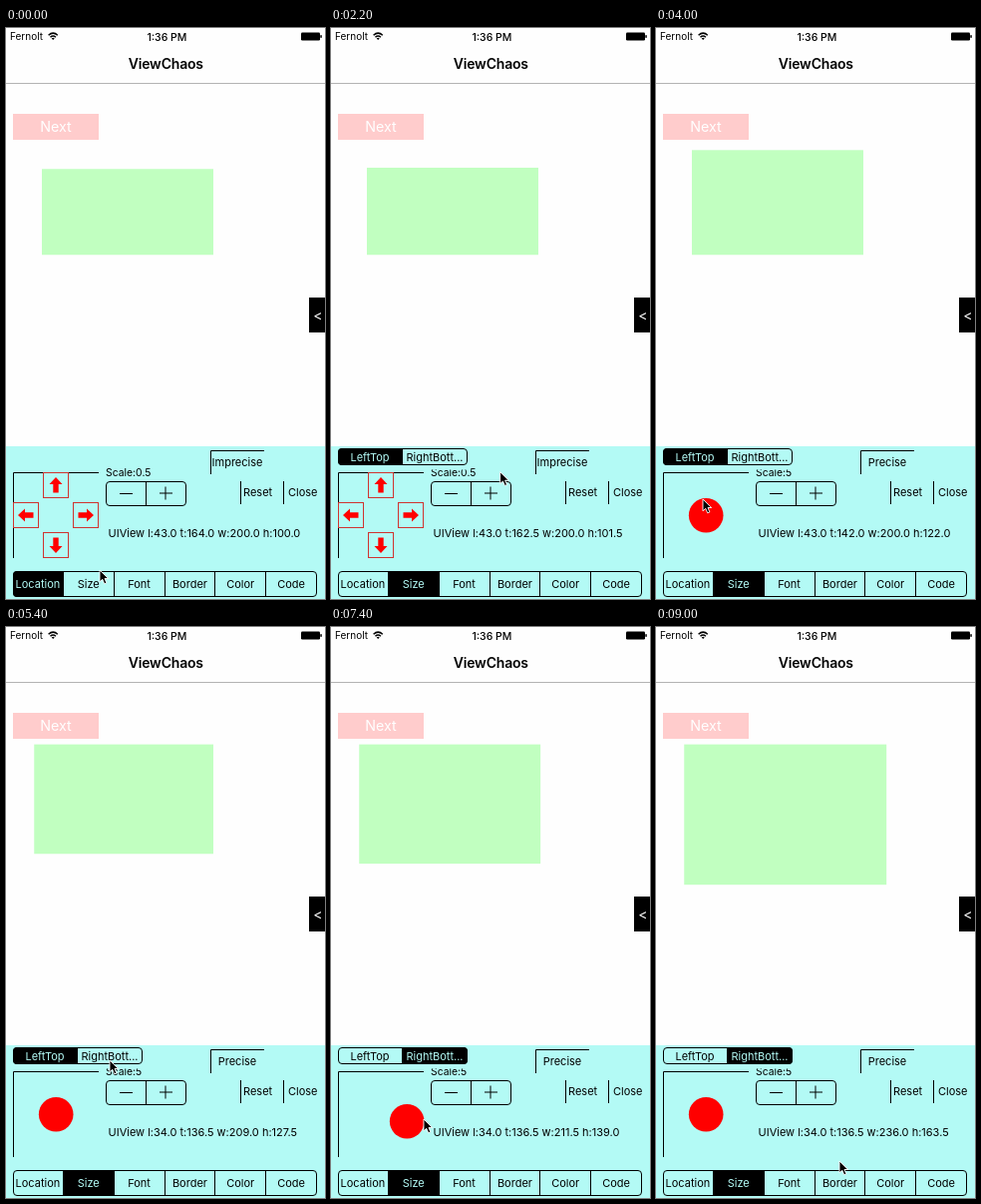
An HTML page for the animation above (9.2 s loop, 320 by 572 pixels).

```html
<!DOCTYPE html>
<html lang="en">
<head>
<meta charset="utf-8">
<title>View editor</title>
<style>
html, body { margin: 0; width: 100%; height: 100%; overflow: hidden; background: #fefefe; }
svg { display: block; width: 320px; height: 572px; }
text { font: 11px Inter, Roboto, sans-serif; fill: #000; white-space: pre; }
.mid { text-anchor: middle; }
.line { fill: none; stroke: #000; stroke-width: 1; }
.cell { fill: none; stroke: #d03430; stroke-width: 1; }
</style>
</head>
<body>
<svg viewBox="0 0 320 572" xmlns="http://www.w3.org/2000/svg">
  <rect width="320" height="572" fill="#fefefe"/>

  <text x="4" y="12" style="font-size:10px">Fernolt</text>
  <path d="M42.6 7.3Q47.2 3 51.8 7.3M44.5 9.3Q47.2 6.8 49.9 9.3" fill="none" stroke="#000" stroke-width="1.5"/>
  <path d="M45.7 10.4Q47.2 9 48.7 10.4L47.2 12Z"/>
  <text class="mid" x="161.5" y="12.5" style="font-size:10.5px;font-weight:500">1:36 PM</text>
  <rect x="296" y="4.5" width="19" height="8" rx="1.3"/>
  <rect x="315.3" y="7" width="1.5" height="3" rx=".7"/>
  <text class="mid" x="160.3" y="41" style="font-size:14px;font-weight:600;letter-spacing:-.2px">ViewChaos</text>
  <rect y="55" width="320" height="1" fill="#b4b4b4"/>

  <rect x="7" y="86" width="86" height="26" fill="#ffcccc"/>
  <text class="mid" x="50" y="104" style="font-size:14.3px;fill:#fff">Next</text>
  <rect id="view" fill="#c1ffc0"/>
  <rect x="304" y="270" width="16" height="35"/>
  <text class="mid" x="313" y="293" style="font-size:14px;fill:#fff">&lt;</text>

  <rect y="419" width="320" height="153" fill="#b3faf5"/>
  <text id="scale" x="100" y="449" style="font-size:10.4px"></text>
  <path class="line" d="M7.5 531V445.5H93M205.5 447V423.5H259M235.5 454V477M278.5 454V477"/>
  <text id="mode" class="mid" x="232" y="439"></text>
  <text x="238" y="469">Reset</text>
  <text x="283" y="469">Close</text>
  <rect class="line" x="100.5" y="454.5" width="80" height="24" rx="3.5"/>
  <path class="line" d="M140.5 454V479M114 466.5H127M154 466H167M160 459.5V472.5"/>
  <text id="info" x="102.5" y="509.5"></text>

  <g id="pad"></g>
  <circle id="ball" cx="50.2" cy="488.2" r="17.3" fill="#ff0000"/>
  <g id="corner"></g>
  <g id="tabs"></g>
  <path id="cursor" d="M0 0V11.8L2.8 9.3 4.7 13.8 6.9 12.9 5 8.5H8.7Z" fill="#000" stroke="#fff" stroke-width=".9"/>
</svg>
<script>
const $ = id => document.getElementById(id);
const PANEL = '#b3faf5', LOOP = 9200, STEP = 200, K = 0.86;
const SIZE_TAB = 600, COARSE = 2600, RIGHT_BOTTOM = 5600;

// Cursor glides: x, y, departure, arrival
const glides = [
  [80, 556, 0, 400], [49, 464, 600, 1200], [230, 435, 1800, COARSE - STEP], [50, 476, COARSE, 3200],
  [47, 472, 3200, 4000], [104, 434, 4800, 5400], [67, 486, RIGHT_BOTTOM, 6200], [184, 535, 8800, 9000]
];

const ramp = (t, a, b) => Math.min(1, Math.max(0, (t - a) / (b - a)));
const bump = (t, a, b) => Math.sin(Math.PI * ramp(t, a, b));
const half = v => Math.round(v * 2) / 2;

function attrs(el, set) {
  for (const name in set) el.setAttribute(name, set[name]);
}

// Segmented control; returns a function that selects one segment
function segments(id, names, x, y, w, h, base) {
  const sw = w / names.length;
  const edge = i => i ? Math.round(x - 1 + sw * i) : x;
  let html = `<clipPath id="${id}Clip"><rect x="${x}" y="${y}" width="${w}" height="${h}" rx="4"/></clipPath>`;
  names.forEach((name, i) => {
    html += `<rect class="seg" x="${edge(i)}" y="${y}" width="${edge(i + 1) - edge(i) + 1}" height="${h}"
      clip-path="url(#${id}Clip)"/>`;
    if (i) html += `<path class="line" d="M${edge(i) + 0.5} ${y}v${h}"/>`;
    html += `<text class="mid" x="${x - 0.5 + sw * (i + 0.5)}" y="${base}">${name}</text>`;
  });
  html += `<rect class="line" x="${x + 0.5}" y="${y + 0.5}" width="${w - 1}" height="${h - 1}" rx="3.5"/>`;
  const g = $(id);
  g.innerHTML += html;
  const fills = g.querySelectorAll('.seg'), labels = g.querySelectorAll('text');
  return pick => names.forEach((_, i) => {
    fills[i].style.fill = i === pick ? '#000' : PANEL;
    labels[i].style.fill = i === pick ? PANEL : '#000';
  });
}

$('corner').innerHTML = `<rect x="7" y="421" width="130" height="21.5" fill="${PANEL}"/>`;
const pickTab = segments('tabs', ['Location', 'Size', 'Font', 'Border', 'Color', 'Code'], 7, 544, 305, 26, 561);
const pickCorner = segments('corner', ['LeftTop', 'RightBott...'], 7, 421, 130, 17, 433.5);

for (let turn = 0; turn < 360; turn += 90) {
  $('pad').innerHTML += `<g transform="rotate(${turn} 50 488)">
    <rect class="cell" x="37.5" y="445.5" width="25" height="25"/>
    <path d="M50 450 56.5 457H52.7V465.5H47.3V457H43.5Z" fill="#ff0000"/></g>`;
}

// Edges of the edited view, in points
function edges(t) {
  return {
    left: half(43 - 9 * ramp(t, 4000, 4800)),
    top: half(164 - 1.5 * ramp(t, 1200, 1800) - 26 * ramp(t, 3200, 4215)),
    right: half(243 + 27 * ramp(t, 7320, 8200)),
    bottom: half(264 + 11.5 * ramp(t, 6400, 7400) + 24.5 * ramp(t, 8200, 8800))
  };
}

// Offset of the joystick ball, stopped by the pad's right side
function push(t) {
  return {
    x: Math.min(26, 30 * bump(t, 7000, 8200)) - 15 * bump(t, 4000, 4800),
    y: 14 * bump(t, 6400, 7600) + 24 * bump(t, 8200, 8800) - 20 * bump(t, 3200, 4000)
  };
}

function draw(ms) {
  const t = Math.floor(ms % LOOP / STEP) * STEP;
  const { left, top, right, bottom } = edges(t);
  const w = right - left, h = bottom - top;
  attrs($('view'), { x: left * K - 1, y: top * K + 0.2, width: w * K, height: h * K });
  $('info').textContent = 'UIView ' + Object.entries({ l: left, t: top, w, h })
    .map(([k, v]) => k + ':' + v.toFixed(1)).join(' ');

  const sizing = t >= SIZE_TAB, coarse = t >= COARSE;
  pickTab(sizing ? 1 : 0);
  pickCorner(t >= RIGHT_BOTTOM ? 1 : 0);
  $('corner').style.display = sizing ? '' : 'none';
  $('pad').style.display = coarse ? 'none' : '';
  $('ball').style.display = coarse ? '' : 'none';
  $('scale').textContent = coarse ? 'Scale:5' : 'Scale:0.5';
  $('mode').textContent = coarse ? 'Precise' : 'Imprecise';

  const ball = push(t);
  let x = 94, y = 543;
  for (const [gx, gy, from, to] of glides) {
    const p = ramp(t, from, to);
    x += (gx - x) * p;
    y += (gy - y) * p;
  }
  attrs($('ball'), { transform: `translate(${ball.x} ${ball.y})` });
  attrs($('cursor'), { transform: `translate(${x + ball.x} ${y + ball.y})` });
}

let start;
function tick(now) {
  if (start === undefined) start = now;
  draw(Math.max(0, now - start));
  requestAnimationFrame(tick);
}
draw(0);
requestAnimationFrame(tick);
</script>
</body>
</html>
```
